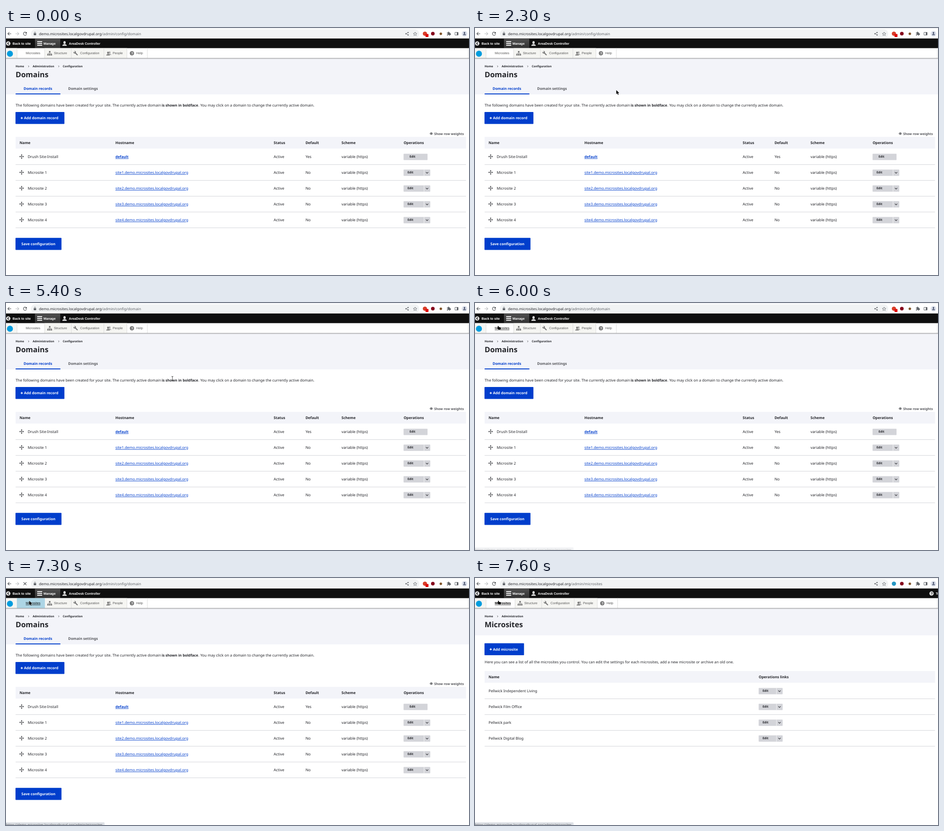
An HTML page for the animation above (8 s loop, 1024 px wide and 547 px high).

```html
<!DOCTYPE html>
<html lang="en">
<head>
<meta charset="utf-8">
<title>Domains</title>
<style>
html, body { margin: 0; width: 100%; height: 100%; overflow: hidden; background: #fff }
svg { display: block; width: 100%; height: 100% }
text { font-family: "Noto Sans", sans-serif; text-rendering: geometricPrecision; white-space: pre }
.bar { font-family: "Liberation Sans", Arial, sans-serif }
.b { font-weight: 700 }
.u { text-decoration: underline; text-decoration-thickness: .7px; text-underline-offset: 1.1px }
</style>
</head>
<body>
<svg id="stage" viewBox="0 0 1024 547"></svg>
<script>
const INK = '#232429', BLUE = '#003ecc', GREY = '#d3d4d9', PALE = '#f3f4f9', DIM = '#5f6368';

const text = (x, y, str, size = 8.25, fill = INK, cls = '') =>
  `<text x="${x}" y="${y}" font-size="${size}" fill="${fill}" class="${cls}">${str}</text>`;
const bold = (x, y, str, size = 8, fill = INK) => text(x, y, str, size, fill, 'b');
const label = (x, y, str) => text(x, y, str, 7.2, '#fff', 'bar b');
const rect = (x, y, w, h, fill, r = 0) =>
  `<rect x="${x}" y="${y}" width="${w}" height="${h}" fill="${fill}" rx="${r}"/>`;
const circle = (x, y, r, fill) => `<circle cx="${x}" cy="${y}" r="${r}" fill="${fill}"/>`;
const fill = (d, color, x = 0, y = 0) => `<path d="${d}" fill="${color}" transform="translate(${x} ${y})"/>`;
const line = (d, color, w = 1, x = 0, y = 0) =>
  `<path d="${d}" fill="none" stroke="${color}" stroke-width="${w}" transform="translate(${x} ${y})"/>`;
const group = (id, body) => `<g id="${id}">${body}</g>`;

const person = (x, y, color, s = 1) => `<g transform="translate(${x} ${y}) scale(${s})">` +
  `<ellipse cy="-2" rx="2.5" ry="3.2" fill="${color}"/>` + fill('M-5 5.2Q-5 2.6-1.5 1.8H1.5Q5 2.6 5 5.2Z', color) + '</g>';

function browser() {
  return rect(0, 0, 1024, 24, '#fff') + rect(132, 0, 892, .8, '#dee1e6') + rect(55, 3, 859, 19, '#f1f3f4', 9.5) +
    line('M4 0H-3.5M0-3.5L-3.5 0L0 3.5', '#4a4d51', 1.1, 7.5, 12.7) +
    line('M-4 0H3.5M0-3.5L3.5 0L0 3.5', '#b9bbbe', 1.1, 25, 12.7) +
    group('reload', line('M3.2-1.8A3.6 3.6 0 1 0 3.6.8', '#4a4d51', 1.1, 42, 12.7) + fill('M4-4.2V-.4H.2Z', '#4a4d51', 42, 12.7)) +
    group('stop', line('M-3.2-3.2L3.2 3.2M3.2-3.2L-3.2 3.2', '#4a4d51', 1.1, 42, 12.7)) +
    rect(61.4, 11.6, 5.2, 4.4, DIM, .6) + line('M-1.5 0V-1.4A1.5 1.5 0 0 1 1.5-1.4V0', DIM, .8, 64, 11.8) +
    text(73, 15.6, 'demo.microsites.localgovdrupal.org', 8.2) +
    line('M2.3-2.6L-2.5 0L2.3 2.6', DIM, .8, 887, 12.7) +
    [[889.3, 10], [884.5, 12.7], [889.3, 15.4]].map(p => circle(...p, 1.3, DIM)).join('') +
    line('M0-4L1.1-1.3L4-1.1L1.8.8L2.5 3.6L0 2.1L-2.5 3.6L-1.8.8L-4-1.1L-1.1-1.3Z', DIM, .8, 904.8, 13) +
    circle(944, 12.6, 4, '#85041c') + circle(961.7, 12.8, 2.8, '#80552a') +
    fill('M-3.8-2H-1.4A1.4 1.4 0 1 1 1.2-2H3.4V.1A1.4 1.4 0 1 1 3.4 2.8V4.4H.9A1.3 1.3 0 1 0-1.6 4.4H-3.8V2.1A1.3 1.3 0 1 0-3.8-.2Z', DIM, 979, 12.2) +
    line('M-3.5-3H3.5V3H-3.5Z', DIM, 1, 996.5, 12.7) + rect(997, 9.5, 3, 6.4, DIM) +
    circle(1014, 12.6, 6.2, '#dce1ec') + person(1014, 12.3, '#47506b', .66);
}

function adminBar() {
  return rect(0, 23.2, 1024, 22, '#0f0f0f') + rect(64, 23.2, 56, 22, 'url(#tab)') +
    circle(5, 34.3, 4.8, '#ddd') + line('M1.2-2.6L-1.4 0L1.2 2.6', '#0f0f0f', 1.4, 5, 34.3) +
    [29.2, 33.2, 37.2].map(y => rect(69, y, 11, 2, '#fff')).join('') +
    person(129.5, 34.3, '#ddd') +
    label(14.5, 36.9, 'Back to site') + label(83, 36.9, 'Manage') + label(139, 36.9, 'AreaDesk Controller');
}

// dx moves the items after the first one, whose label grows when active
function tray(dx, active) {
  const soft = '#f5f5f2', icon = '#787878', top = 44.6, h = 22;
  const link = (x, str) => text(x, 58.4, str, 7.15, '#565656', 'bar');
  return rect(0, top, 1024, h, '#fff') + rect(0, top, 24, h, soft) + rect(85.5 + dx, top, 182, h, soft) +
    [24.5, ...[85.5, 144.5, 216.5, 267.5, 312.5].map(x => x + dx), 1022.5].map(x => rect(x - .5, top, 1, h, '#ddd')).join('') +
    (active ? '' : group('focus', rect(24, top, 62, h, '#add5e5'))) +
    circle(8.7, 57, 6.7, '#009cde') +
    (active ? text(43.7, 58.4, 'Microsites', 7.2, '#000', 'bar b u')
            : group('plain', link(43.7, 'Microsites')) + group('hover', text(43.7, 58.4, 'Microsites', 7.2, '#000', 'bar u'))) +
    `<g transform="translate(${dx} 0)">` +
    rect(95, 51, 3.4, 3.2, icon) + [91.2, 95, 98.8].map(x => rect(x, 57.6, 3.2, 3.2, icon)).join('') +
    line('M92.8 57.6V56H100.4V57.6M96.7 54V57.6', icon, .8) +
    line('M150.8 52.8L158.3 60', icon, 2.3) + circle(151.8, 53.6, 2.8, icon) + fill('M148 51L150 50L152.6 52.6L151 54.4Z', soft) +
    person(229.2, 55.7, '#aaa', .75) + person(225.7, 56.5, icon, .82) +
    circle(278.5, 56, 4.8, icon) + text(276.8, 58.6, '?', 7.4, '#fff', 'bar b') +
    link(106, 'Structure') + link(164, 'Configuration') + link(236, 'People') + link(288, 'Help') + '</g>';
}

const header = (h, title, crumbs) => rect(0, 67, 1024, h, PALE) + rect(0, 66.4, 1024, 3, 'url(#shade)') +
  crumbs.map(([x, s], i) => bold(x, 87, s, 6.3) + (i ? line('M-.8-1.7L.9 0L-.8 1.7', INK, .8, x - 9, 85) : '')).join('') +
  bold(21.2, 109, title, 16.5);
const button = (y, w, str, plus) => rect(21, y, w, 26.6, BLUE, 1) +
  bold(plus ? 39.7 : 34, y + 16.3, str, 8, '#fff') + (plus ? line('M-2.4 0H2.4M0-2.4V2.4', '#fff', 1.5, 34.8, y + 13.4) : '');
const head = (y, cells) => rect(21.3, y, 996.2, 26, PALE) + cells.map(([x, s]) => bold(x, y + 16.2, s, 8.05)).join('');
const rule = y => rect(21.3, y + 17, 996.2, 1, GREY);
const edit = (x, y, w) => rect(x, y - 6.6, w, 14, GREY, 1) + bold(x + 8.7, y + 2.4, 'Edit', 6.7) +
  rect(x + w - 14.2, y - 6.6, 1, 14, '#f4f4f6') + line('M-2.6-1.4L0 1.3L2.6-1.4', INK, 1.1, x + w - 7, y + .5);
const drag = y => line('M-4 0H4M0-4V4', '#393a3f', .9, 34.6, y) +
  fill('M-5.2 0L-3-1.8V1.8ZM5.2 0L3-1.8V1.8ZM0-5.2L-1.8-3H1.8ZM0 5.2L-1.8 3H1.8Z', '#393a3f', 34.6, y);

function domains() {
  const row = i => {
    const y = 285 + 35 * i, t = y + 3;
    return drag(y - .3) + rule(y) + text(48, t, i ? 'Microsite ' + i : 'Drush Site-Install', i ? 8.25 : 8.4) +
      (i ? text(242, t, `site${i}.demo.microsites.localgovdrupal.org`, 8.3, BLUE, 'u') + edit(879.3, y, 59)
         : text(242, t, 'default', 8, BLUE, 'b u') + rect(879.3, y - 6.6, 53, 14, GREY, 1) + bold(892.5, y + 2.4, 'Edit', 6.7)) +
      text(592, t, 'Active', 8.35) + text(662.4, t, i ? 'No' : 'Yes', 8.4) + text(742, t, 'variable (https)', 8.3);
  };
  return text(211.8, 15.6, '/admin/config/domain', 8.2, DIM) + circle(926.5, 12.6, 4.7, '#d8402c') + rect(927.8, 13.3, 6.6, 6.8, '#e00b0b', 1) +
    tray(0, false) + header(80, 'Domains', [[21.3, 'Home'], [59, 'Administration'], [125.6, 'Configuration']]) +
    bold(39, 137.2, 'Domain records', 8, BLUE) + bold(137.5, 137.2, 'Domain settings', 8, '#55565b') + rect(21.3, 145, 99, 2, BLUE) +
    text(21.3, 174, 'The following domains have been created for your site. The currently active domain', 8.23) +
    bold(344.2, 174, 'is shown in boldface') +
    text(425.3, 174, '. You may click on a domain to change the currently active domain.', 8.21) +
    button(186, 108.2, 'Add domain record', true) +
    line('M-3.3 0Q0-4.2 3.3 0Q0 4.2-3.3 0Z', '#393a3f', 1, 940.6, 233.8) + circle(940.6, 233.8, 1.3, '#393a3f') +
    bold(947, 236.6, 'Show row weights', 7.25, '#55565b') +
    head(241, [[30, 'Name'], [242, 'Hostname'], [592, 'Status'], [662.4, 'Default'], [742, 'Scheme'], [879.4, 'Operations']]) +
    [0, 1, 2, 3, 4].map(row).join('') + button(464.8, 101.7, 'Save configuration', false);
}

function microsites() {
  const row = (s, i) => text(30, 253 + 35 * i, 'Pellwick ' + s, 8.2) + edit(627.4, 250 + 35 * i, 53) + rule(250 + 35 * i);
  return text(211.8, 15.6, '/admin/microsites', 8.2, DIM) + circle(926.5, 12.6, 4.7, '#2597c4') +
    tray(3, true) + header(60, 'Microsites', [[21.3, 'Home'], [59, 'Administration']]) +
    circle(1009.7, 34.3, 4.8, '#ddd') + text(1008, 36.9, '?', 7.4, '#0f0f0f', 'bar b') + label(1019, 36.9, 'To') +
    button(144.5, 87.4, 'Add microsite', true) +
    text(21.3, 189.3, 'Here you can see a list of all the microsites you control. You can edit the settings for each microsites, add a new microsite or archive an old one.', 8.23) +
    head(206, [[30, 'Name'], [627.6, 'Operations links']]) +
    ['Independent Living', 'Film Office', 'park', 'Digital Blog'].map(row).join('');
}

const shape = (id, d) => `<path id="${id}" d="${d}" fill="#000" stroke="#fff" stroke-width=".7" paint-order="stroke"/>`;
const stage = document.getElementById('stage');
stage.innerHTML = `<defs>
  <linearGradient id="tab" x2="0" y2="1"><stop offset=".2" stop-color="#4b4b4b"/><stop offset="1" stop-color="#303030"/></linearGradient>
  <linearGradient id="shade" x2="0" y2="1"><stop stop-opacity=".36"/><stop offset="1" stop-opacity="0"/></linearGradient>
  </defs>` + browser() + adminBar() + group('domains', domains()) + group('microsites', microsites()) +
  group('status', rect(-3, 541, 221, 12, '#dee1e6', 2) +
    text(0, 549.3, 'https://demo.microsites.localgovdrupal.org/admin/microsites', 7.4, DIM)) +
  group('cursor',
    group('beam', line('M-2-4.6Q0-4.6 0-3.6Q0-4.6 2-4.6M0-4V4M-2 4.6Q0 4.6 0 3.6Q0 4.6 2 4.6', '#333', .9)) +
    shape('arrow', 'M0 0V9L2.1 7.1L3.6 10.4L5.1 9.7L3.7 6.5H6.5Z') +
    shape('hand', 'M-.6 0Q.4-.8 1.1.2L1.8 2.3L5.2 2.9Q6.4 3.3 6.2 4.6L5.6 7.7H.8L-2.4 4.6Q-2.2 3.2-.4 4Z'));

// time, x, y of the pointer's hot spot
const path = [[1500, 131, 13], [1700, 248, 99], [2100, 248, 99], [2500, 377, 176], [3300, 377, 176], [3500, 371, 170],
  [5300, 371, 170], [5400, 368, 167], [6000, 51, 51], [6600, 51, 51], [6700, 51.4, 50.6], [8000, 51.4, 50.6]];

function pointer(t) {
  const i = Math.max(1, path.findIndex(p => p[0] >= t));
  const [t0, x0, y0] = path[i - 1], [t1, x1, y1] = path[i];
  const k = (t - t0) / (t1 - t0), e = k * k * (3 - 2 * k);
  return [x0 + (x1 - x0) * e, y0 + (y1 - y0) * e];
}

const el = id => document.getElementById(id);
const show = (id, on) => el(id).style.display = on ? '' : 'none';

function draw(now) {
  const t = Math.floor(now % 8000 / 100) * 100;
  const during = (a, b = 8000) => t >= a && t < b;
  const loaded = during(7500), loading = during(7300, 7500);
  const beam = during(1500, 1600) || during(3400, 5500), hand = during(6000, 7300) || during(7600);
  show('domains', !loaded);
  show('microsites', loaded);
  show('stop', loading);
  show('reload', !loading);
  show('focus', during(7200));
  show('hover', during(6000));
  show('plain', !during(6000));
  show('cursor', during(1500));
  show('beam', beam);
  show('hand', hand);
  show('arrow', !beam && !hand);
  el('status').style.opacity = Math.min(1, Math.max(0, (t - 5950) / 140));
  el('cursor').setAttribute('transform', `translate(${pointer(t)})`);
  requestAnimationFrame(draw);
}
requestAnimationFrame(draw);
</script>
</body>
</html>
```
